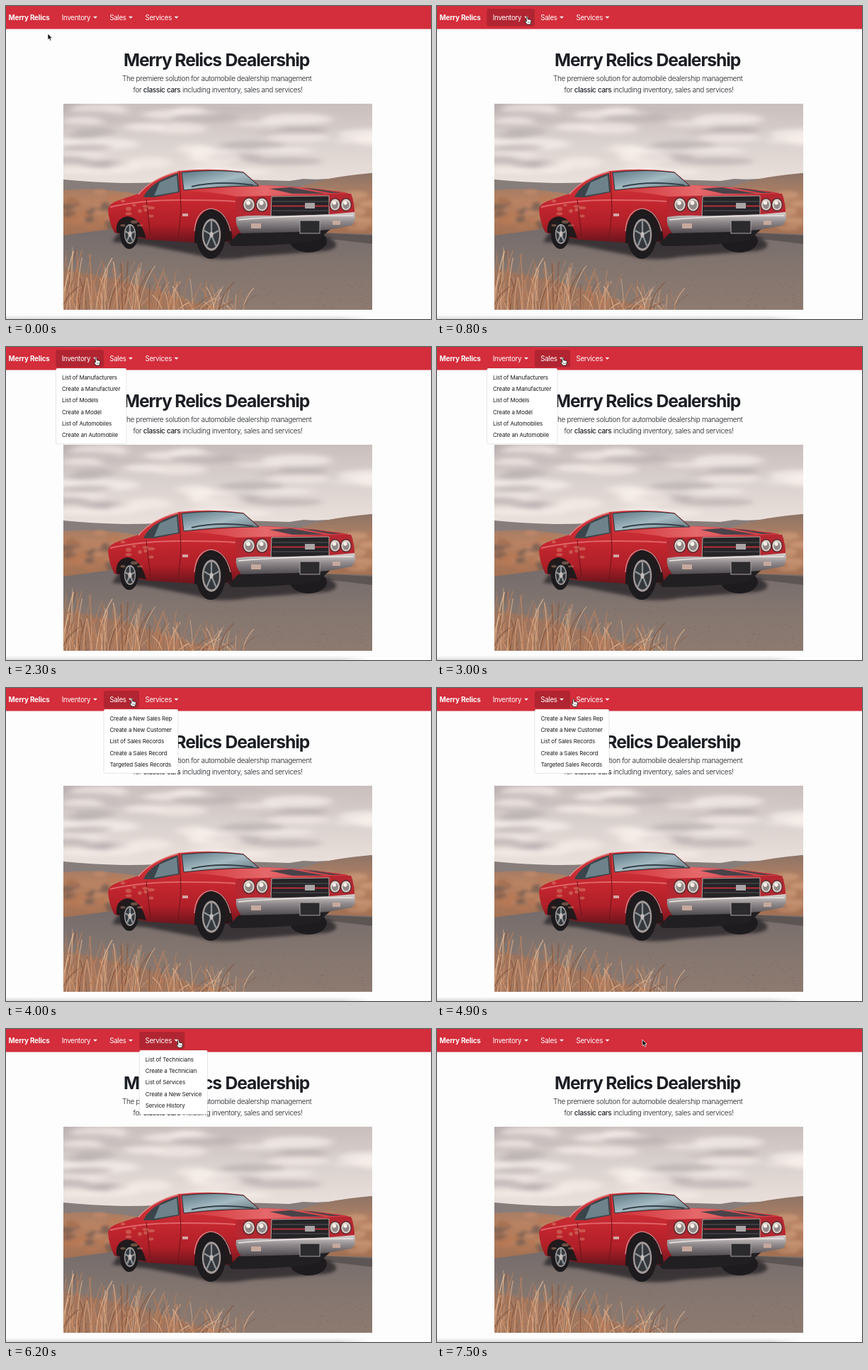
An HTML page for the animation above (7600 ms loop, 600 px wide and 442 px high).

```html
<!DOCTYPE html>
<html lang="en">
<head>
<meta charset="utf-8">
<title>Dealership menu</title>
<style>
  html, body { margin: 0; width: 100%; height: 100%; overflow: hidden; background: #fdfdfd; }
  svg { display: block; width: 100vw; height: 100vh; }
  text { font-family: Inter, "Noto Sans", sans-serif; fill: #1c1f24; white-space: pre; }
  .brand { font-size: 9.9px; font-weight: 700; letter-spacing: -.2px; fill: #fff; }
  .nav { font-size: 9.7px; letter-spacing: -.3px; fill: #fff; }
  .item { font-size: 8px; letter-spacing: -.13px; fill: #16181b; }
  .title { font-size: 24.7px; font-weight: 700; letter-spacing: -1.12px; }
  .lead { font-size: 10px; font-weight: 300; letter-spacing: -.32px; }
  .lead tspan { font-weight: 500; }
</style>
</head>
<body>
<svg id="stage" viewBox="0 0 600 442" preserveAspectRatio="none">
  <defs>
    <clipPath id="photoClip"><rect x="81" y="138" width="436" height="290.5"/></clipPath>
    <filter id="soft" x="-30%" y="-60%" width="160%" height="220%"><feGaussianBlur stdDeviation="6 3"/></filter>
    <filter id="haze" x="-20%" y="-40%" width="140%" height="180%"><feGaussianBlur stdDeviation="2"/></filter>
    <linearGradient id="sky" x2="0" y2="1">
      <stop stop-color="#c9bfbd"/><stop offset=".4" stop-color="#d9d1ce"/><stop offset="1" stop-color="#f0e5df"/>
    </linearGradient>
    <linearGradient id="road" x2="0" y2="1">
      <stop stop-color="#756c6c"/><stop offset=".5" stop-color="#84766f"/><stop offset="1" stop-color="#8d7a70"/>
    </linearGradient>
    <linearGradient id="field" x2="0" y2="1">
      <stop stop-color="#8d7467"/><stop offset=".4" stop-color="#b98363"/><stop offset="1" stop-color="#9d6c50"/>
    </linearGradient>
    <linearGradient id="paint" x2="0" y2="1">
      <stop stop-color="#d43a40"/><stop offset=".45" stop-color="#c4272f"/><stop offset=".75" stop-color="#b01f28"/><stop offset="1" stop-color="#6b151c"/>
    </linearGradient>
    <linearGradient id="hood" x2="1" y2="0">
      <stop stop-color="#cf3037"/><stop offset=".5" stop-color="#e5686a"/><stop offset="1" stop-color="#c8333a"/>
    </linearGradient>
    <linearGradient id="glass" x2="1" y2="1">
      <stop stop-color="#587582"/><stop offset=".5" stop-color="#a5bac2"/><stop offset="1" stop-color="#5d7078"/>
    </linearGradient>
    <linearGradient id="chrome" x2="0" y2="1">
      <stop stop-color="#d9d4d3"/><stop offset=".45" stop-color="#918b8d"/><stop offset="1" stop-color="#4d494d"/>
    </linearGradient>
    <linearGradient id="base" x2="0" y2="1">
      <stop stop-color="#fdfdfd"/><stop offset="1" stop-color="#dcdcdc"/>
    </linearGradient>
    <linearGradient id="baseFade"><stop offset=".92" stop-color="#fff"/><stop offset="1" stop-color="#000"/></linearGradient>
    <mask id="baseMask"><rect y="436" width="512" height="6" fill="url(#baseFade)"/></mask>
  </defs>

  <rect width="600" height="442" fill="#fdfdfd"/>
  <rect y="436" width="512" height="6" fill="url(#base)" mask="url(#baseMask)"/>
  <text class="title" x="166" y="85">Merry Relics</text>
  <text class="title" x="309.5" y="85">Dealership</text>
  <text class="lead" x="164" y="106.3">The premiere solution for automobile dealership management</text>
  <text class="lead" x="179.5" y="121.6">for <tspan>classic cars</tspan> including inventory, sales and services!</text>

  <g clip-path="url(#photoClip)">
    <rect x="81" y="138" width="436" height="130" fill="url(#sky)"/>
    <g id="clouds" filter="url(#soft)"></g>
    <path d="M81 245Q120 249 165 250T260 243L400 247L420 244Q460 247 517 236V330H81Z" fill="#877d7b"/>
    <path d="M81 260Q130 255 190 266L400 262Q440 242 517 236V335H81Z" fill="url(#field)"/>
    <g id="bushes" filter="url(#haze)"></g>
    <path d="M81 324L150 315L440 320L517 322V429H81Z" fill="url(#road)"/>
    <path d="M440 320L517 324V336L450 328Z" fill="#5d5554"/>
    <g id="specks" fill="#5c514e"></g>
    <path d="M150 333L200 338L272 352Q300 362 345 354L450 346Q480 341 455 326L320 318L160 318Z" fill="#2b2729" opacity=".8" filter="url(#haze)"/>

    <g id="car">
      <ellipse cx="427" cy="332" rx="26" ry="16" fill="#1d1b1d"/>
      <path d="M300 315H458L440 331Q390 339 318 339Z" fill="#211f22"/>
      <path d="M144 287Q145 279 160 274L187 265Q206 243 243 233Q290 228 335 234L357 253Q430 255 482 264Q492 270 492 292V303L455 312L328 321L317 333L266 334L200 330L153 320Q145 305 144 287Z" fill="url(#paint)"/>
      <path d="M250 261L357 253Q430 255 484 265L326 269Q290 262 250 261Z" fill="url(#hood)"/>
      <path d="M372 258L402 256L450 265H404ZM418 257L435 258L474 264H459Z" fill="#4a4349"/>
      <path d="M194 270Q204 248 243 236L245 263L210 270Z" fill="#39454b"/>
      <path d="M209 268L217 249L241 239L243 262Z" fill="#6d828a"/>
      <path d="M248 235Q296 230 335 235L357 254Q300 254 251 260Z" fill="url(#glass)" stroke="#2c3236"/>
      <path d="M262 255Q300 246 349 253" fill="none" stroke="#34424a" stroke-width="2"/>
      <path d="M187 266Q206 243 243 234" fill="none" stroke="#e8a19c" stroke-width="1.2"/>
      <path d="M147 284Q190 274 245 274T324 276" fill="none" stroke="#e0656a" stroke-width="2"/>
      <path d="M245 234L247 288L243 329M198 273L204 324" fill="none" stroke="#6e141b"/>
      <path d="M156 320Q154 299 172 297Q190 299 198 328ZM266 335Q265 292 289 286Q317 289 320 332Z" fill="#23191b"/>
      <path d="M266 318Q268 289 289 286Q310 288 317 318" fill="none" stroke="#d9969a" stroke-width="1.2"/>
      <g id="wheels"></g>
      <path d="M325 270L487 265Q492 275 490 294L328 298Q323 283 325 270Z" fill="#b52831"/>
      <path d="M375 269L456 268V295L374 297Z" fill="#252427" stroke="#b8aaa8"/>
      <path d="M376 276H455M376 289H455" stroke="#56555a"/>
      <path d="M376 282.5H455" stroke="#ba3038" stroke-width="2"/>
      <rect x="422" y="278" width="14" height="8" fill="#aaa5a6"/>
      <rect x="249" y="293" width="8" height="4" fill="#d1a6a2"/>
      <g id="lamps"></g>
      <path d="M325 298Q350 294 385 297L458 294L492 291Q495 303 488 310L455 316L415 319L332 321Q323 310 325 298Z" fill="url(#chrome)"/>
      <path d="M328 302Q390 296 490 296" fill="none" stroke="#eee7e4" stroke-width="1.4"/>
      <path d="M346 307H360V314H346ZM461 303H472V309H461Z" fill="#c6a99d"/>
      <rect x="415" y="303" width="28" height="18" fill="#2b2b2d" stroke="#aaa3a3"/>
    </g>
    <path d="M81 372Q150 382 212 402T320 429H81Z" fill="#a87354" opacity=".65" filter="url(#haze)"/>
    <g id="grass" fill="none" stroke-linecap="round"></g>
  </g>

  <rect width="600" height="32.5" fill="#d42d3b"/>
  <rect id="hover" y="4" height="24.5" rx="2.5" fill="#b02531"/>
  <text class="brand" x="3.5" y="20">Merry Relics</text>
  <g id="navbar"></g>
  <g id="menus"></g>
  <g id="arrow"><path d="M0 0V8.8L2 7L3.4 10.2L5 9.5L3.6 6.4H6.3Z" fill="#111" stroke="#fff" stroke-width=".7"/></g>
  <g id="hand"><path d="M-.9 .8Q0-.6 1 .8L1.3 4Q2.3 3.2 3 4.2Q4 3.5 4.5 4.6Q5.8 4.2 6 5.7L5.6 8.4L4.8 11H.2L-2.9 7Q-2.8 5.7-.7 7Z" fill="#fff" stroke="#111" stroke-width=".8"/><path d="M1.2 7V9M2.7 7V9M4.1 7V9" stroke="#333" stroke-width=".5"/></g>
</svg>
<script>
const $ = id => document.getElementById(id);
const LOOP = 7600, STEP = 100;

const menus = [
  { label: "Inventory", left: 70.5, tab: 67.5, width: 99.5, caret: 126, items: ["List of Manufacturers", "Create a Manufacturer", "List of Models", "Create a Model", "List of Automobiles", "Create an Automobile"] },
  { label: "Sales", left: 138, tab: 50, width: 105, caret: 176, items: ["Create a New Sales Rep", "Create a New Customer", "List of Sales Records", "Create a Sales Record", "Targeted Sales Records"] },
  { label: "Services", left: 188.3, tab: 64, width: 96.2, caret: 240.5, items: ["List of Technicians", "Create a Technician", "List of Services", "Create a New Service", "Service History"] }
];

$("navbar").innerHTML = menus.map(m => `
  <text class="nav" x="${m.left + 8.3}" y="20">${m.label}</text>
  <path d="M${m.caret - 3} 14.8h6l-3 3z" fill="#fff"/>`).join("");

$("menus").innerHTML = menus.map(m => `<g>
  <rect x="${m.left}" y="30" width="${m.width}" height="${m.items.length * 16.3 + 9}" rx="2" fill="#fff" stroke="#000" stroke-opacity=".14" stroke-width=".7"/>
  ${m.items.map((name, i) => `<text class="item" x="${m.left + 8.4}" y="${45.6 + i * 16.3}">${name}</text>`).join("")}
</g>`).join("");

let seed = 17;
const rand = (a = 0, b = 1) => {
  seed = (seed * 16807) % 2147483647;
  return a + (b - a) * seed / 2147483647;
};
const pick = list => list[Math.floor(rand(0, list.length))];
const repeat = (n, draw) => Array.from({ length: n }, (_, i) => draw(i)).join("");
const blob = (x, y, rx, ry, fill, more = "") =>
  `<ellipse cx="${x}" cy="${y}" rx="${rx}" ry="${ry}" fill="${fill}" ${more}/>`;

$("clouds").innerHTML = repeat(44, i => {
  const y = 140 + i * 2.2;
  return blob(rand(75, 520), y, rand(20, 55), rand(3, 9), pick(["#fbf3ee", "#f7eeea", "#b5acae", "#c4bbbb"]), 'opacity=".65"');
});
$("bushes").innerHTML = repeat(55, i => i % 3
  ? blob(rand(81, 165), rand(262, 314), rand(5, 13), rand(2, 6), pick(["#c78e6b", "#8a6253", "#b87954", "#6d5950"]), 'opacity=".65"')
  : blob(rand(455, 520), rand(254, 315), rand(5, 18), rand(2, 6), pick(["#c3906f", "#a06e52", "#d0a07f"]), 'opacity=".65"'));
$("specks").innerHTML = repeat(150, () => {
  const y = rand(345, 428);
  return `<rect x="${rand(150, 517)}" y="${y}" width="${(y - 320) / 35}" height=".8" opacity=".35"/>`;
});

const wheel = (x, y, rx, ry) =>
  blob(x, y, rx, ry, "#1d1b1d") + blob(x + 1, y, rx * .63, ry * .67, "#a39b9a") +
  blob(x + 1, y, rx * .52, ry * .57, "#34373b") +
  repeat(5, i => {
    const a = i * Math.PI * .4 - Math.PI / 2;
    return `<path d="M${x + 1} ${y}l${Math.cos(a) * rx * .52} ${Math.sin(a) * ry * .57}" stroke="#8d9498" stroke-width="2.3"/>`;
  }) + blob(x + 1, y, 2.5, 4, "#c3bcba");
$("wheels").innerHTML = wheel(174, 322, 13, 21) + wheel(289, 323, 21, 34);

$("lamps").innerHTML = [[343, 9], [361.5, 9], [464.5, 8], [480, 8]].map(([x, r]) =>
  blob(x, 280.5, r, r + 1.5, "#54272b") + blob(x, 280.5, r - 1.3, r, "#d8cfc9") +
  blob(x, 281, r - 3.5, r - 2.5, "#918988") + blob(x - 1, 278, r / 3, r / 3, "#faf1e9")).join("");

$("grass").innerHTML = repeat(190, () => {
  const u = rand() ** 1.5, x = 78 + u * 260, tall = rand(15, 95) * (1 - u * .65), lean = rand(-15, 24);
  return `<path d="M${x} 431q${lean * .2} ${-tall * .6} ${lean} ${-tall}" stroke="${pick(["#d8a27e", "#b97853", "#84563f", "#e4b893", "#c18460"])}" stroke-width="${rand(.5, 1.6)}" opacity=".75"/>`;
}) + repeat(12, i => blob(165 + (i % 6) * 8, 284 + rand(-9, 28), rand(2, 5), rand(1, 3), "#dda080", 'opacity=".4"'));

// Pointer stops: time, x, y
const stops = [[0, 59, 39], [200, 59, 39], [800, 127, 15], [2500, 127, 15], [2900, 177.5, 15],
  [4500, 177.5, 15], [4900, 192.5, 15.5], [5400, 243.5, 15.5], [6700, 243.5, 15.5], [7200, 290, 15], [7600, 290, 15]];

function pointerAt(t) {
  const i = stops.findIndex(s => s[0] > t);
  const [t0, x0, y0] = stops[i - 1], [t1, x1, y1] = stops[i];
  const k = (t - t0) / (t1 - t0), e = k * k * (3 - 2 * k);
  return [x0 + (x1 - x0) * e, y0 + (y1 - y0) * e];
}

const hoverAt = t => t < 600 ? -1 : t < 2700 ? 0 : t < 5000 ? 1 : t < 6900 ? 2 : -1;
const openAt = t => t < 1100 ? -1 : t < 3500 ? 0 : t < 5800 ? 1 : t < 6700 ? 2 : -1;
const show = (el, on) => el.setAttribute("visibility", on ? "visible" : "hidden");

function render(time) {
  const t = Math.floor((time % LOOP) / STEP) * STEP;
  const hovered = menus[hoverAt(t)], open = openAt(t);
  const place = `translate(${pointerAt(t).join(" ")})`;
  show($("hover"), hovered);
  if (hovered) {
    $("hover").setAttribute("x", hovered.left);
    $("hover").setAttribute("width", hovered.tab);
  }
  [...$("menus").children].forEach((menu, i) => show(menu, i === open));
  for (const id of ["arrow", "hand"]) {
    $(id).setAttribute("transform", place);
    show($(id), (id === "hand") === !!hovered);
  }
}

const start = performance.now();
function tick() {
  render(performance.now() - start);
  requestAnimationFrame(tick);
}
tick();
</script>
</body>
</html>
```
